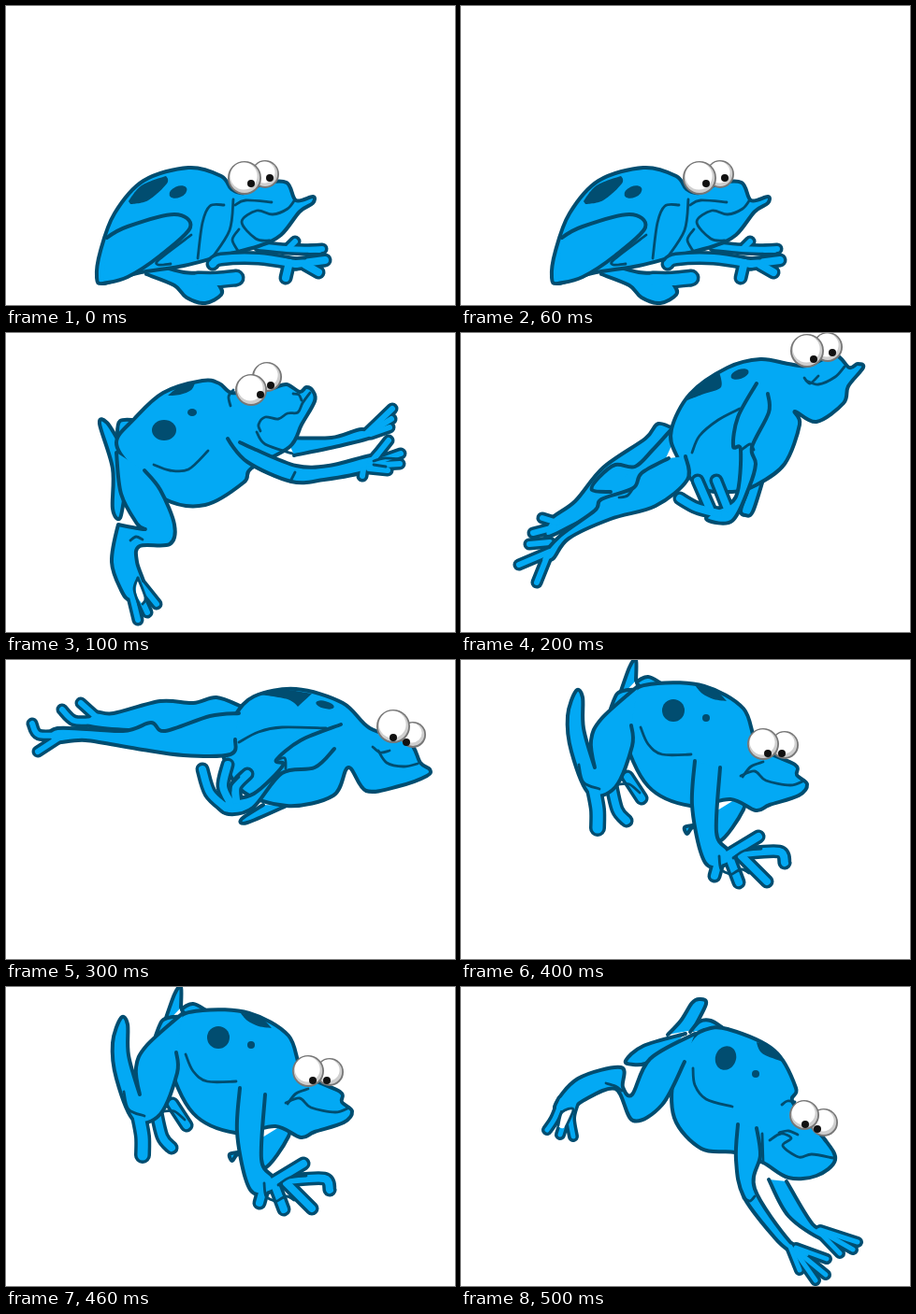
An HTML page with a canvas that plays this animation: 480 by 320 pixels, repeating every 600 ms.

```html
<!DOCTYPE html>
<html lang="en">
<head>
<meta charset="utf-8">
<title>Leaping frog</title>
<style>
html, body { margin: 0; height: 100%; overflow: hidden; background: #fff; }
canvas { display: block; }
</style>
</head>
<body>
<canvas id="stage" width="480" height="320"></canvas>
<script>
const ctx = document.getElementById('stage').getContext('2d');
const BLUE = '#03a9f4', DARK = '#014d70', STEP = 100;

// Smooth curve through "x,y" points; a "!" marks a sharp corner.
function curve(text, closed) {
  const pts = text.split(' ').map(p => ({ xy: p.split(',').map(parseFloat), sharp: p.endsWith('!') }));
  const n = pts.length, path = new Path2D();
  const at = i => closed ? pts[(i + n) % n] : pts[Math.max(0, Math.min(n - 1, i))];
  const handle = (i, side) => at(i).xy.map((v, k) =>
    at(i).sharp ? v : v + side * (at(i + 1).xy[k] - at(i - 1).xy[k]) / 6);
  path.moveTo(...pts[0].xy);
  for (let i = 0; i < (closed ? n : n - 1); i++)
    path.bezierCurveTo(...handle(i, 1), ...handle(i + 1, -1), ...at(i + 1).xy);
  return path;
}

function stroke(path, width, color = DARK) {
  ctx.lineWidth = width;
  ctx.strokeStyle = color;
  ctx.stroke(path);
}

function fill(path, color) {
  ctx.fillStyle = color;
  ctx.fill(path);
}

function skin(text) {
  const path = curve(text, true);
  fill(path, BLUE);
  stroke(path, 4);
}

// Open-ended outline whose toes are round tubes merged into it.
function limb(text, width, ...toes) {
  const path = curve(text), tubes = toes.map(t => curve(t));
  tubes.forEach(t => stroke(t, width + 7));
  fill(path, BLUE);
  stroke(path, 4);
  tubes.forEach(t => stroke(t, width, BLUE));
}

function toes(width, ...paths) {
  const tubes = paths.map(t => curve(t));
  tubes.forEach(t => stroke(t, width + 7));
  tubes.forEach(t => stroke(t, width, BLUE));
}

const lines = (...paths) => paths.forEach(p => stroke(curve(p), 2.8));
const spot = text => fill(curve(text, true), DARK);

function oval(x, y, rx, ry = rx, turn = 0, color = DARK) {
  const path = new Path2D();
  path.ellipse(x, y, rx, ry, turn, 0, 7);
  fill(path, color);
}

function eye(x, y, r, px, py) {
  const disc = (x, y, r, color) => oval(x, y, r, r, 0, color);
  disc(x, y, r, '#777');
  disc(x, y - .3, r - 1.8, '#cfcfcf');
  disc(x - .8, y - 2, r - 3.6, '#fff');
  disc(px, py, 4, '#111');
}

function crouch() {
  limb('150,287 180,299 193,312 213,318 230,309 228,299 215,287 190,285 160,277', 12, '205,293 226,293 246,291');
  toes(6, '270,257 300,260 335,261', '303,258 309,252', '325,261 338,260');
  skin('97,290 101,262 116,222 147,187 195,173 230,182 241,196 255,200 275,190 300,189 310,208 328,204 328,211 314,220 294,245 270,257 228,268 190,278 140,286 104,297');
  spot('131,209! 145,192 171,182! 172,190 152,208 133,212!');
  oval(184, 199, 10, 6, -.4);
  limb('108,248! 130,236 180,223 197,237 165,267 130,290 104,297');
  lines('198,245 164,271 163,277 176,276', '205,270 210,232 218,214 233,213', '243,207 239,240 220,270',
    '249,239 242,250 248,262', '245,213 256,208 284,210',
    '309,207 301,217 285,223 268,219 252,231 267,249 282,251');
  toes(8, '221,276 230,271 270,270 310,276', '302,278 299,291', '310,276 341,272', '320,277 334,285');
  lines('297,268 307,270 320,270');
  eye(277, 180, 15, 282, 184);
  eye(255, 184, 18, 262, 190);
}

function takeoff() {
  limb('120,115 108,96 100,97 114,145 114,188 122,198 128,165');
  limb('119,113 122,94 145,94');
  limb('300,112 348,112 380,103 395,110 360,120 308,131', 6, '386,107 413,81', '388,107 412,92', '390,108 410,101');
  skin('241,64 228,54 210,51 168,64 137,92 118,117 135,145 170,178 213,184 254,160 262,145 303,122 316,98 330,73 328,62 321,58 314,63 300,55 285,59 265,62');
  lines('272,105 270,98 277,90 291,92 301,86 312,85 317,75 325,64', '268,106 277,119 306,129',
    '316,72 313,66 307,65', '243,61 238,68 240,78', '158,141 175,147 195,146 216,126');
  spot('173,67! 186,57 202,53! 198,61 186,66');
  oval(169, 104, 13, 11);
  oval(199, 85, 5, 4);
  limb('237,113! 258,138 305,159 340,157 385,148 400,135 390,131 345,142 310,142 265,124 250,117', 6,
    '388,140 397,130 409,115', '388,141 422,129', '388,142 421,140', '388,145 408,147', '382,146 381,153');
  lines('393,137 404,134 421,135', '393,141 406,143', '309,149 304,159');
  limb('118,128 123,172 140,204 148,210 120,205! 113,245 123,275 133,286 150,278 140,245 143,228 175,226 180,205 165,168 148,147', 6,
    '134,278 141,307', '141,277 151,299', '145,270 161,290');
  fill(curve('141,262! 149,283 146,290 139,278', true), '#fff');
  lines('141,262 149,283 146,290', '141,262 137,274 142,291', '133,222 139,218 146,221');
  eye(279, 47, 16, 283, 56);
  eye(262, 61, 17, 272, 66);
}

function soar() {
  limb('325,150 312,191 304,195 299,190 306,170');
  limb('232,105 211,97 197,113 152,144 122,180 95,200 92,218 125,203 205,165', 6,
    '103,203 87,198', '100,208 77,214', '95,224 73,226');
  skin('225,103 245,65 285,37 320,28 350,33 370,35 400,24 415,37 424,33 430,37 414,57 409,75 380,95 357,84 362,98 346,140 315,163 290,170 255,165 230,130');
  limb('224,104 205,125 186,143 165,141 147,155 140,168 160,170');
  limb('222,134 193,150 184,166 150,178 143,190 106,217 85,242 98,242 115,220 160,199 208,185 242,157 240,132', 6,
    '95,234 62,248', '93,237 81,267');
  lines('184,166 178,174 169,176', '247,128 255,110 275,93 298,81');
  spot('239,73! 255,55 276,42! 278,58 260,65');
  oval(298, 44, 10, 5, -.35);
  limb('316,54 296,90 291,121 299,125 294,175 270,190 263,200 290,201 308,165 315,140 311,122 329,85 328,65', 8,
    '275,193 252,187 234,177', '266,188 253,158', '285,188 273,158');
  lines('300,125 309,119 313,125', '367,48 373,54 382,46', '369,51 382,55 400,47 410,36');
  eye(392, 15, 16, 397, 21);
  eye(370, 19, 18, 377, 28);
}

function glide() {
  limb('275,155 252,170 258,174 300,156');
  limb('252,50 225,40 200,46 165,44 115,57 95,56 90,71 170,76 240,70', 6, '100,64 80,46', '95,65 73,65 60,53');
  skin('243,62 265,39 310,31 360,46 389,73 430,87 443,110 453,117 450,124 420,135 385,140 366,115 350,145 300,156 250,138 230,90');
  limb('249,57 218,60 170,76 155,67 125,76 55,73 50,88 85,86 140,95 190,102 240,101 245,85', 6,
    '60,80 35,80 28,68', '60,81 34,98');
  lines('249,88 270,77 295,72 342,73');
  spot('271,37! 290,31 327,36! 312,50! 301,42');
  oval(341, 48, 10, 4, .26);
  limb('358,69 315,86 289,107 296,113 265,143 235,150 225,155 238,165 264,158 295,121 330,115 351,95', 8,
    '235,158 218,142 210,117', '240,153 232,135 237,112', '246,150 246,135 258,122');
  lines('289,107 298,105 299,116', '240,140 241,134 249,125', '392,93 400,99 410,97', '398,97 407,110 425,114 440,111');
  eye(435, 80, 14, 428, 88);
  eye(414, 71, 18, 414, 83);
}

function descend() {
  limb('168,42 180,8 187,0 187,22');
  limb('160,52 167,36 178,32 193,31 188,24 200,18 214,25');
  toes(8, '160,130 167,160 177,172', '178,125 193,148');
  limb('300,145 302,160 275,195 250,179 242,186 239,179 248,177');
  skin('182,36 210,25 260,28 302,52 318,92 357,112 359,123 370,133 361,145 330,155 315,161 288,149 245,156 200,135 175,80');
  limb('189,28 150,63 139,86 143,115! 131,73 130,40 123,33 114,60 118,98 137,143 165,136 183,92 182,70', 11, '142,138 146,160 146,180');
  lines('126,112 131,131 148,138', '168,133 180,133 191,142');
  spot('251,28! 270,31 284,44! 270,42 258,36');
  oval(227, 54, 12);
  oval(262, 62, 4);
  lines('192,72 200,90 215,101 246,101');
  limb('250,108 247,155 256,205 268,222 290,215 285,203 273,184 277,115', 8,
    '276,213 271,231', '288,214 297,238', '300,210 327,237', '285,209 318,189', '300,207 340,205 346,217');
  lines('276,210 278,224 287,229', '291,212 303,204 321,202', '290,229 300,224 308,228',
    '301,125 310,114 323,109', '299,124 314,119 326,129 352,134 367,129');
  eye(346, 91, 15, 343, 100);
  eye(323, 90, 17, 328, 100);
}

function land() {
  limb('221,51 235,36 247,17 255,13 262,18 248,46');
  limb('245,48 255,37 267,36 280,44');
  limb('240,50 195,63 176,79 184,83 197,82 216,72');
  limb('329,206 350,245 386,270 395,262 376,254 348,208', 5, '382,261 405,285', '384,261 419,281', '384,260 424,273');
  skin('245,58 260,46 285,45 335,68 358,108 355,124 388,162 400,185 380,202 350,204 323,188 293,177 257,173 228,140 228,90');
  limb('250,50 202,77 183,115 173,107 171,86 125,98 100,128 115,134 130,122 165,109 184,143 215,126 239,80', 5,
    '108,121 100,141 92,153', '115,126 110,145 106,158', '121,124 117,140 120,160');
  fill(curve('104,148 108,134 120,131 111,150', true), '#fff');
  lines('104,148 108,134 120,131 112,150', '155,103 165,106 172,111');
  spot('316,59! 333,66 344,80! 322,71');
  oval(283, 76, 11, 13, .35);
  oval(315, 93, 4);
  lines('248,87 250,105 262,120 290,128');
  limb('296,147 294,185 302,224 335,268 352,283 370,290 372,283 352,273 314,216 320,180 316,151', 5,
    '352,278 362,303', '358,284 379,314', '362,285 390,308', '358,279 391,291');
  lines('302,226 309,229 314,224', '322,157 323,188', '343,126 349,122 357,123',
    '330,164 342,157 353,162 344,170 361,182 375,179 398,183', '340,156 350,154 360,158');
  eye(388, 145, 15, 381, 152);
  eye(367, 137, 16, 368, 147);
}

const poses = [crouch, takeoff, soar, glide, descend, land];

function frame() {
  ctx.fillStyle = '#fff';
  ctx.fillRect(0, 0, 480, 320);
  ctx.lineCap = ctx.lineJoin = 'round';
  poses[Math.floor(performance.now() / STEP) % poses.length]();
  requestAnimationFrame(frame);
}
frame();
</script>
</body>
</html>
```
